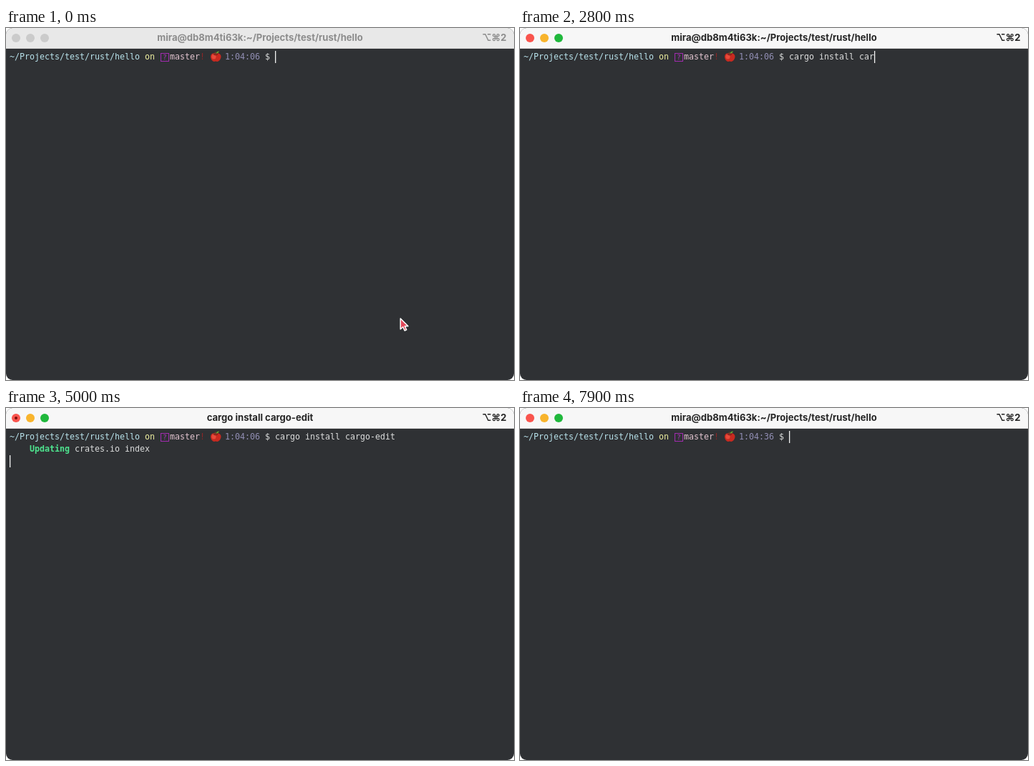
An HTML page for the animation above (8 s loop, 710x492 px).

```html
<!DOCTYPE html>
<html lang="en">
<head>
<meta charset="utf-8">
<title>Terminal</title>
<style>
  html, body { margin: 0; width: 100%; height: 100%; overflow: hidden; background: #fff; }
  svg { display: block; }
  text { white-space: pre; font: 11.63px "DejaVu Sans Mono", monospace; fill: #dcdddd; }
  .bar { font: 700 13.08px Inter, sans-serif; }
  .ok { font-weight: 700; fill: #4ee58f; }
</style>
</head>
<body>
<svg id="stage" width="710" height="492" viewBox="0 0 710 492"></svg>
<script>
const LOOP = 8000, CHAR = 7, LINE = 17, LEFT = 5;
const FOCUS = 100, ENTER = 4200, UPDATE = 4300, RESULT = 5200, DONE = 5300, CLEAR = 6300;
const command = "cargo install cargo-edit";
// moment at which each character of the command appears
const keys = [500, 600, 700, 900, 1000, 1200, 1300, 1400, 1500, 1600, 1700, 1800,
              1900, 2300, 2600, 2700, 2800, 2900, 3100, 3400, 3600, 3800, 3900, 4000];
const stage = document.getElementById("stage");

const text = (x, y, s, attrs = "") => `<text x="${x}" y="${y}" ${attrs}>${s}</text>`;
const baseline = row => 44 + row * LINE;
const caret = (x, row) =>
  `<rect x="${x}" y="${32 + row * LINE}" width="1.3" height="${LINE}" fill="#f2f2f2"/>`;

function titleBar(t) {
  const active = t >= FOCUS, running = t >= ENTER && t < DONE;
  const ink = `class="bar" style="fill:${active ? "#262626" : "#8c8c8c"}"`;
  const lights = ["#f9544d", "#f8b42c", "#20b83c"].map((c, i) =>
    `<circle cx="${14 + i * 20}" cy="14" r="6" fill="${active ? c : "#cbcbcb"}"/>`).join("");
  const title = running ? command : "mira@db8m4ti63k:~/Projects/test/rust/hello";
  return `<rect width="710" height="28" fill="${active ? "#f7f7f7" : "#e8e8e8"}"/>
    <rect y="28" width="710" height="1" fill="#d0d0d0"/>` + lights +
    (running ? '<circle cx="14" cy="14" r="2" fill="#7c0c0a"/>' : "") +
    text(355, 18, title, ink + ' text-anchor="middle"') +
    text(699.5, 17.5, "⌥⌘2", ink + ' text-anchor="end"');
}

const apple = `
  <path d="M293 36C290 34 286 36 286 40C286 44 289 47 291 47L293 46.5L295 47C298 47 300.5 43 300.5 40C300.5 36 296 34 293 36Z" fill="#c92a20"/>
  <ellipse cx="290.5" cy="40" rx="3" ry="3.5" fill="#e84a3a"/>
  <path d="M290 36.5Q293 39 296 36.5" fill="none" stroke="#7c1f18" stroke-width="1.2"/>
  <path d="M293 37Q293 34.5 292 33.5" fill="none" stroke="#70442a" stroke-width="1.2"/>
  <path d="M293.5 35.5Q294 32.5 298 32.5Q297 35.5 293.5 35.5Z" fill="#65a832"/>`;

function prompt(row, time, typed = "") {
  const y = baseline(0), fill = c => `style="fill:${c}"`;
  return `<g transform="translate(0 ${row * LINE})">` +
    text(LEFT, y, "~/Projects/test/rust/hello", fill("#b9e3ec")) +
    text(194, y, "on", fill("#eef0a0")) +
    `<rect x="216.5" y="35.5" width="11" height="11" fill="none" stroke="#a22bb0"/>` +
    text(222, 44, "?", 'text-anchor="middle" style="font-size:9px;fill:#b335c0"') +
    text(229, y, "master", fill("#e3c5d0")) +
    text(271, y, "!", fill("#8c2727")) + apple +
    text(306, y, time, fill("#918eb4")) +
    text(362, y, "$ " + typed) + `</g>`;
}

const status = (row, label, rest) =>
  text(LEFT, baseline(row), `<tspan class="ok">${label}</tspan>${rest}`);

function shell(t) {
  if (t >= CLEAR) return prompt(0, "1:04:36") + caret(376, 0);
  const count = keys.filter(k => k <= t).length;
  let out = prompt(0, "1:04:06", command.slice(0, count));
  if (t < ENTER) return out + caret(376 + count * CHAR, 0);
  if (t < UPDATE) return out + caret(LEFT, 1);
  out += status(1, "    Updating", " crates.io index");
  if (t < RESULT) return out + caret(LEFT, 2);
  out += status(2, "     Ignored",
    " package `cargo-edit v0.10.0` is already installed, use --force to override");
  return out + (t < DONE ? caret(LEFT, 3) : prompt(3, "1:04:36") + caret(376, 3));
}

const pointer = `<path d="M551.3 406V421L554.8 417.8L557.2 423L559.8 421.8L557.4 416.7H562Z"
  fill="#e2485a" stroke="#fff" stroke-width="1.5" stroke-linejoin="round"/>`;

function draw(t) {
  stage.innerHTML = `
    <clipPath id="win"><rect width="710" height="492" rx="9"/></clipPath>
    <g clip-path="url(#win)">
      <rect width="710" height="492" fill="#2f3134"/>
      ${titleBar(t)}${shell(t)}${t < keys[0] ? pointer : ""}
    </g>`;
}

let last = -1;
function tick() {
  const t = Math.floor(performance.now() % LOOP / 100) * 100;
  if (t !== last) draw(last = t);
  requestAnimationFrame(tick);
}
tick();
</script>
</body>
</html>
```
